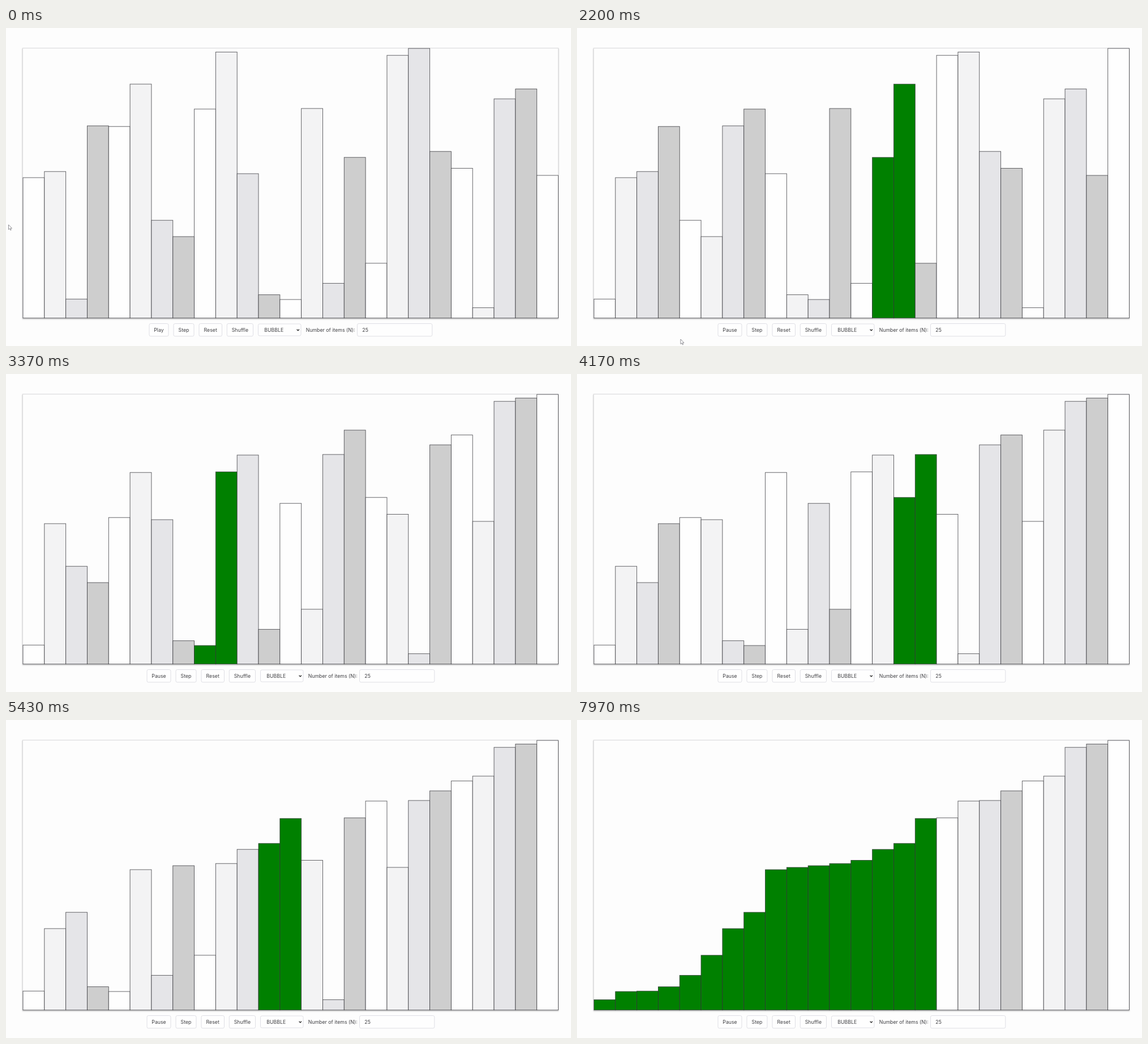
Recreate the animation shown at these times as an HTML page. Size 998 by 561 pixels, loop 8 s.

```html
<!DOCTYPE html>
<html lang="en">
<head>
<meta charset="utf-8">
<title>Bubble sort</title>
<style>
  html, body { margin: 0; width: 100%; height: 100%; overflow: hidden; background: #fdfdfd; }
  svg { display: block; width: 998px; height: 561px; }
  .panel { fill: #fdfdfd; stroke: #dadadc; filter: drop-shadow(0 1px 1.2px rgba(0, 0, 0, .28)); }
  #bars rect { stroke: #333338; stroke-opacity: .82; stroke-width: .9; }
  .control { fill: #fefefe; stroke: #dcdce2; stroke-width: .9; }
  text { font: 8.75px Inter, "Open Sans", sans-serif; fill: #404044; }
  .middle { text-anchor: middle; }
  #cursor { fill: #fff; stroke: #77777d; stroke-width: .8; }
</style>
</head>
<body>
<svg viewBox="0 0 998 561">
  <rect class="panel" x="29.5" y="35.7" width="946" height="476.3"/>
  <g id="bars"></g>
  <rect id="playBox" class="control" y="521.5" height="22.3" rx="2.6"/>
  <text id="playText" class="middle" x="270" y="536">Play</text>
  <g id="controls">
    <rect class="control" x="296" y="521.5" width="36" height="22.3" rx="2.6"/>
    <text class="middle" x="314" y="536">Step</text>
    <rect class="control" x="341" y="521.5" width="40.5" height="22.3" rx="2.6"/>
    <text class="middle" x="361.2" y="536">Reset</text>
    <rect class="control" x="390.3" y="521.5" width="46.2" height="22.3" rx="2.6"/>
    <text class="middle" x="413.4" y="536">Shuffle</text>
    <rect class="control" x="445.5" y="522" width="75.5" height="21" rx="2.6"/>
    <text x="456.3" y="536">BUBBLE</text>
    <path d="M513.6 531.6l2.2 2.2 2.2-2.2" fill="none" stroke="#222" stroke-width="1.3"/>
    <text x="529.7" y="536">Number of items (N):</text>
    <rect class="control" x="620.5" y="521.5" width="132.3" height="22.3" rx="2.6"/>
    <text x="629.3" y="536">25</text>
  </g>
  <path id="cursor" d="M0 0V8.6L2 6.8 3.4 9.8 4.7 9.2 3.4 6.3H6Z"/>
</svg>
<script>
const LOOP = 8000, START = 992, COMPARE = 4.3, SWAP = 38;
const SWEEP_START = 7460, SWEEP_STEP = 33.4;
const LEFT = 30, BASE = 511.7, PITCH = 37.82;
const FILLS = ['#fefefe', '#f3f3f4', '#e5e5e8', '#cecece'];
const GREEN = '#008000';

// Top edge of each bar; a smaller value is a taller bar.
const tops = [264, 253.2, 478.2, 172.7, 173.8, 99, 339.2, 368, 143, 42.4, 257, 470.6, 479,
  142, 450.4, 228.2, 415, 48.2, 36, 217.8, 247.5, 493.4, 125, 107.6, 260];

const byId = id => document.getElementById(id);

function bubbleSteps() {
  const items = tops.slice();
  const steps = [{ time: 0, items: tops, pair: -2 }];
  let time = START;
  for (let end = items.length - 1, moved = true; moved; end--) {
    moved = false;
    for (let j = 0; j < end; j++) {
      steps.push({ time, items: items.slice(), pair: j });
      time += COMPARE;
      if (items[j] <= items[j + 1]) {
        [items[j], items[j + 1]] = [items[j + 1], items[j]];
        moved = true;
        steps.push({ time, items: items.slice(), pair: j });
        time += SWAP;
      }
    }
  }
  return steps;
}

const steps = bubbleSteps();

const bars = tops.map((_, i) => {
  const bar = document.createElementNS('http://www.w3.org/2000/svg', 'rect');
  bar.setAttribute('x', LEFT + i * PITCH);
  bar.setAttribute('width', PITCH);
  byId('bars').append(bar);
  return bar;
});

function drawBars(t) {
  const sweeping = t >= SWEEP_START;
  const step = sweeping ? steps.at(-1) : steps.findLast(s => s.time <= t);
  const swept = sweeping ? Math.floor((t - SWEEP_START) / SWEEP_STEP) : -1;
  bars.forEach((bar, i) => {
    const active = sweeping ? i <= swept : i === step.pair || i === step.pair + 1;
    bar.setAttribute('y', step.items[i]);
    bar.setAttribute('height', BASE - step.items[i]);
    bar.setAttribute('fill', active ? GREEN : FILLS[i % 4]);
  });
}

function drawControls(playing) {
  byId('playText').textContent = playing ? 'Pause' : 'Play';
  byId('playBox').setAttribute('x', playing ? 249 : 253);
  byId('playBox').setAttribute('width', playing ? 42 : 34);
  byId('controls').setAttribute('transform', `translate(${playing ? 4 : 0} 0)`);
}

const cursorPath = [[0, 4.5, 347], [100, 4.5, 347], [800, 268, 535], [1060, 268, 535],
  [1600, 188, 549], [2200, 183, 549], [2480, 181, 564]];

function drawCursor(t) {
  const next = cursorPath.findIndex(p => p[0] > t);
  const [t1, x1, y1] = cursorPath.at(next);
  const [t0, x0, y0] = next < 0 ? cursorPath.at(-1) : cursorPath[next - 1];
  const k = next < 0 ? 0 : (t - t0) / (t1 - t0);
  const ease = k * k * (3 - 2 * k);
  byId('cursor').setAttribute('transform',
    `translate(${x0 + (x1 - x0) * ease} ${y0 + (y1 - y0) * ease})`);
}

const origin = performance.now();
function frame() {
  const t = (performance.now() - origin) % LOOP;
  drawBars(t);
  drawControls(t >= START - 20);
  drawCursor(t);
  requestAnimationFrame(frame);
}
frame();
</script>
</body>
</html>
```
